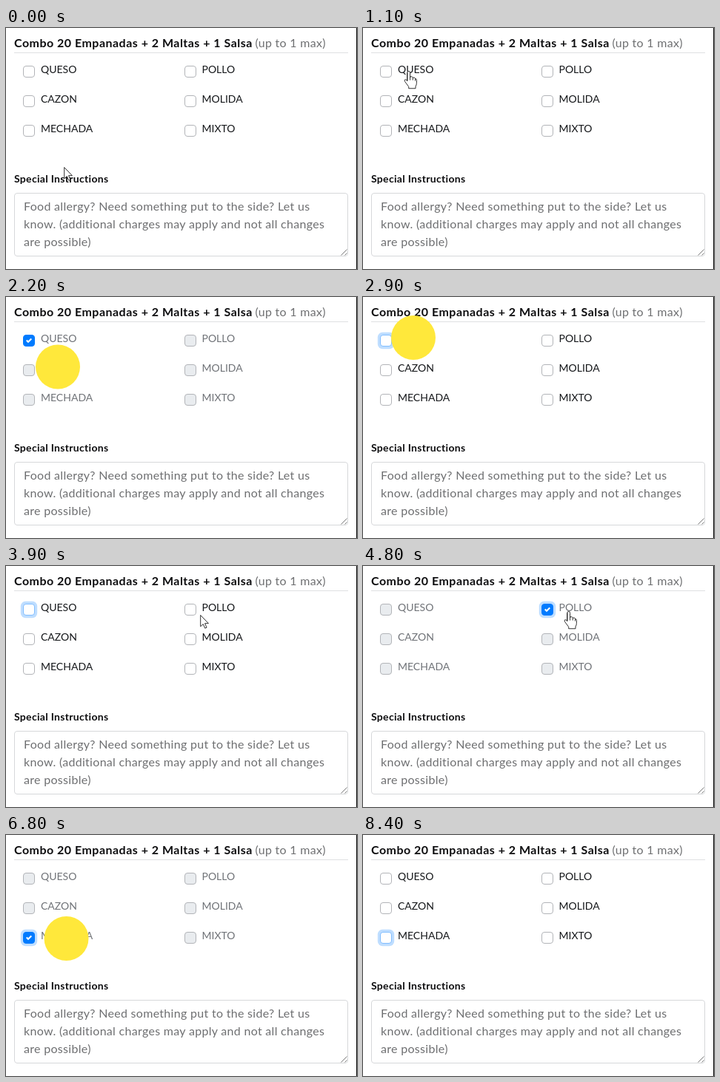
An HTML page with a canvas that plays this animation: 474 px wide and 326 px high, repeating every 8500 ms.

```html
<!DOCTYPE html>
<html lang="en">
<head>
<meta charset="utf-8">
<title>Order options</title>
<style>
  html, body { margin: 0; width: 474px; height: 326px; overflow: hidden; background: #fff; }
  svg, canvas { position: absolute; left: 0; top: 0; display: block; }
  text { font: 16px Lato, "Open Sans", sans-serif; fill: #6e6f71; letter-spacing: .3px; white-space: pre; }
  .head { font-weight: 700; fill: #0c0c0e; letter-spacing: .48px; }
  .sub { font-size: 14px; font-weight: 700; fill: #0c0c0e; letter-spacing: .31px; }
  .opt { font-size: 14px; fill: #16181b; letter-spacing: 0; }
  .off { fill: #707378; }
</style>
</head>
<body>
<svg id="labels" width="474" height="326">
  <text class="head" x="11" y="26">Combo 20 Empanadas + 2 Maltas + 1 Salsa</text>
  <text x="336.5" y="26">(up to 1 max)</text>
  <text class="sub" x="11" y="209">Special Instructions</text>
  <text x="24" y="247">Food allergy? Need something put to the side? Let us</text>
  <text x="24" y="271">know. (additional charges may apply and not all changes</text>
  <text x="24" y="295">are possible)</text>
</svg>
<canvas id="stage" width="474" height="326"></canvas>
<script>
const LOOP = 8500, STEP = 100;
const ctx = document.getElementById('stage').getContext('2d');
const svg = document.getElementById('labels');

const QUESO = 0, POLLO = 1, MECHADA = 4;
const options = ['QUESO', 'POLLO', 'CAZON', 'MOLIDA', 'MECHADA', 'MIXTO'].map((name, i) => {
  const x = 23 + (i % 2) * 218, y = 51 + (i >> 1) * 40;
  const el = document.createElementNS('http://www.w3.org/2000/svg', 'text');
  el.textContent = name;
  el.setAttribute('x', x + 24 - (i % 2) * 0.5);
  el.setAttribute('y', y + 10);
  svg.appendChild(el);
  return { x, y, el, w: 24 + name.length * 10 };
});

// [start, end, option]
const checked = [[1300, 2800, QUESO], [4400, 5200, POLLO], [6700, 7300, MECHADA]];
const focused = [[1300, 2100, QUESO], [2800, 4300, QUESO], [4400, 5100, POLLO],
                 [5200, 6600, POLLO], [6700, 7200, MECHADA], [7300, LOOP, MECHADA]];
// [start, x, y], each shown for 300 ms
const clicks = [[1200, 64, 60], [2100, 70, 94.5], [2700, 68, 55], [4300, 278, 60],
                [5100, 278, 63], [6600, 81.5, 140], [7200, 81.5, 140]];
// [time, x, y] of the pointer tip
const route = [[0, 79, 188], [500, 66, 66], [700, 66, 66], [1100, 62, 58], [1500, 64, 60],
               [2000, 70, 94], [2400, 70, 94], [2700, 68, 55], [3300, 70, 56], [3900, 263, 66],
               [4200, 278, 60], [5300, 278, 62], [5700, 92, 114], [6000, 82, 139],
               [7400, 82, 139], [7800, 96, 330], [LOOP, 96, 330]];

const arrow = new Path2D('M0 0V16.5L3.8 13L6.5 19L9 18L6.3 12H11.5Z');
const hand = new Path2D('M-2 2Q-2 0 0 0Q2 0 2 2V9Q2 7.5 4 7.7Q5.8 8 6 9.5Q8 8.5 9.3 10' +
  'L9.6 11Q11.5 10.5 11.5 13V17Q11.5 20 10 22V25H0V22.5L-5.5 15Q-7 12.5 -5 12Q-4 11.8 -2 14Z');
const knuckles = new Path2D('M2 8V13M6 9.5V13M9.5 11V14M-2 2V14');
const tick = new Path2D('M6.564.75l-3.59 3.612-1.538-1.55L0 4.26 2.974 7.25 8 2.193z');

const during = (list, t) => {
  const hit = list.find(([a, b]) => t >= a && t < b);
  return hit ? hit[2] : -1;
};

function box(x, y, w, h, r, fill, line) {
  ctx.beginPath();
  ctx.roundRect(x + .5, y + .5, w - 1, h - 1, r - .5);
  if (fill) { ctx.fillStyle = fill; ctx.fill(); }
  ctx.strokeStyle = line;
  ctx.lineWidth = 1;
  ctx.stroke();
}

function pointer(t) {
  const i = route.findIndex(p => p[0] > t);
  const [t0, x0, y0] = route[i - 1], [t1, x1, y1] = route[i];
  const k = (1 - Math.cos(Math.PI * (t - t0) / (t1 - t0))) / 2;
  return [x0 + (x1 - x0) * k, y0 + (y1 - y0) * k];
}

function drawPanel() {
  ctx.fillStyle = '#dee0e2';
  ctx.fillRect(11, 33, 451, 1);
  box(11, 223, 451, 86, 4, null, '#d6d8da');
  ctx.strokeStyle = '#777';
  ctx.beginPath();
  ctx.moveTo(452.5, 307.5); ctx.lineTo(460.5, 299.5);
  ctx.moveTo(457.5, 307.5); ctx.lineTo(460.5, 304.5);
  ctx.stroke();
  ctx.fillStyle = '#111';
  ctx.fillRect(473, 0, 1, 326);
}

function drawOption(o, on, focus, off) {
  o.el.setAttribute('class', on || off ? 'opt off' : 'opt');
  if (focus) {
    ctx.fillStyle = '#bfdeff';
    ctx.beginPath();
    ctx.roundRect(o.x - 3.2, o.y - 3.2, 22.4, 22.4, 6.5);
    ctx.fill();
  }
  const fill = on ? '#007bff' : off ? '#e9ecef' : '#fff';
  const line = on ? '#007bff' : focus ? '#80bdff' : '#b2b4b8';
  box(o.x, o.y, 16, 16, 4, fill, line);
  if (on) {
    ctx.save();
    ctx.translate(o.x + 4, o.y + 4);
    ctx.fillStyle = '#fff';
    ctx.fill(tick);
    ctx.restore();
  }
}

function drawPointer(t, sel) {
  const [x, y] = pointer(t);
  const over = options.some((o, i) => (sel < 0 || sel === i) &&
    x >= o.x && x <= o.x + o.w && y >= o.y - 4 && y <= o.y + 14);
  const shape = over ? hand : arrow;
  ctx.save();
  ctx.translate(Math.round(x) - .3, Math.round(y) + .5);
  ctx.scale(.93, .93);
  ctx.lineJoin = 'round';
  ctx.lineWidth = 1;
  ctx.fillStyle = '#fff';
  ctx.strokeStyle = '#222';
  ctx.fill(shape);
  ctx.stroke(shape);
  if (over) ctx.stroke(knuckles);
  ctx.restore();
}

function draw(t) {
  const sel = during(checked, t), focus = during(focused, t);
  ctx.clearRect(0, 0, 474, 326);
  drawPanel();
  options.forEach((o, i) => drawOption(o, sel === i, focus === i, sel >= 0 && sel !== i));
  drawPointer(t, sel);
  const click = clicks.find(c => t >= c[0] && t < c[0] + 300);
  if (click) {
    ctx.fillStyle = '#ffe83b';
    ctx.beginPath();
    ctx.arc(click[1], click[2], 30, 0, 7);
    ctx.fill();
  }
}

const start = performance.now();
function loop() {
  const t = (performance.now() - start) % LOOP;
  draw(Math.floor(t / STEP) * STEP);
  requestAnimationFrame(loop);
}
loop();
</script>
</body>
</html>
```
